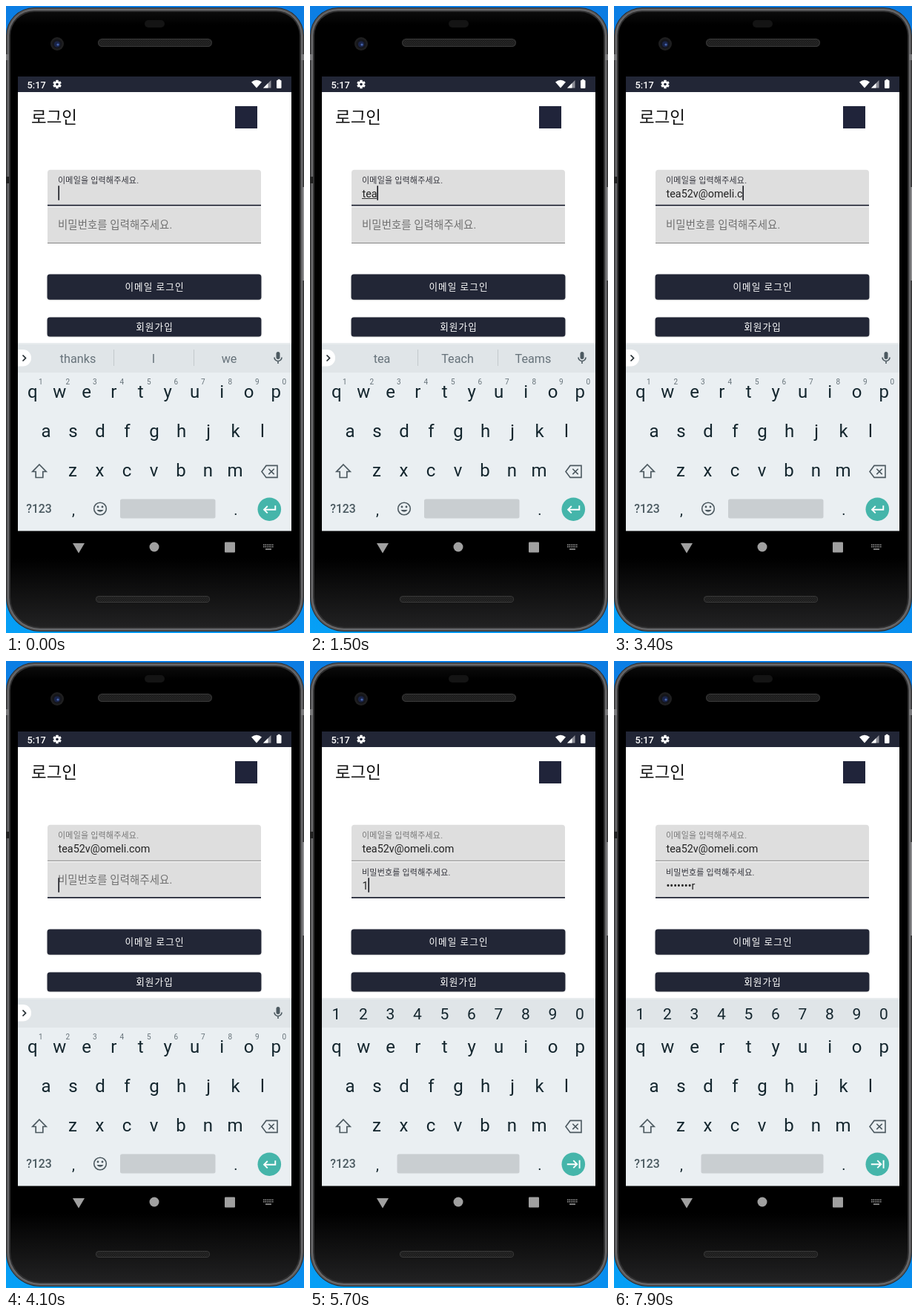
Recreate the animation shown at these times as an HTML page with a canvas. Size 402x845 px, loop 8000 ms.

```html
<!DOCTYPE html>
<html lang="ko">
<head>
<meta charset="utf-8">
<title>로그인</title>
<style>
html, body { margin: 0; width: 100%; height: 100%; overflow: hidden; background: #0b84ea; }
canvas { display: block; width: 402px; height: 845px; }
</style>
</head>
<body>
<canvas id="stage"></canvas>
<script>
const W = 402, H = 845, LOOP = 8000;
const NAVY = '#222636', INK = '#14262e', ICON = '#4c5960', TEAL = '#45b5aa';
const FONT = 'Roboto, "Noto Sans CJK KR", "Noto Sans CJK", sans-serif';
const INPUT_SIZE = 14.4, INPUT_X = 70.5;

const canvas = document.getElementById('stage');
const c = canvas.getContext('2d');
const dpr = window.devicePixelRatio || 1;
canvas.width = W * dpr;
canvas.height = H * dpr;

const COMMON = ['thanks', 'I', 'we'];
// [start, typed email, suggestions]
const EMAIL = [
  [0, '', COMMON],
  [1200, 't', COMMON],
  [1300, 'te', ['t', 'to', 'the']],
  [1400, 'tea', ['te', 'tea', 'tell']],
  [1500, 'tea', ['tea', 'Teach', 'Teams']],
  [1600, 'tea5', ['tea', 'Teach', 'Teams']],
  [1800, 'tea5', ['tea5', 'Tea5', 'teas5']],
  [1900, 'tea52', ['tea52', 'Tea52', 'teas52']],
  [2000, 'tea52v', ['tea52v', 'Tea52v', 'teach52v']],
  [2200, 'tea52v@', []],
  [2300, 'tea52v@o', []],
  [2500, 'tea52v@om', []],
  [2700, 'tea52v@omel', []],
  [3000, 'tea52v@omeli', []],
  [3200, 'tea52v@omeli.', COMMON],
  [3400, 'tea52v@omeli.c', []],
  [3500, 'tea52v@omeli.co', []],
  [3700, 'tea52v@omeli.com', []]
];
const SECRET = '123wqaer';
const SECRET_TIMES = [5700, 5900, 6200, 6400, 6700, 6900, 7200, 7400];
const CARET_OFF = [[300, 800], [4400, 4800], [5300, 5700], [7900, 8000]];
const FOCUS_MOVE = 4100, NUMBER_ROW = 4200;

function box(x, y, w, h, color, r = 0) {
  c.fillStyle = color;
  c.beginPath();
  c.roundRect(x, y, w, h, r);
  c.fill();
}

function disc(x, y, r, color) {
  c.fillStyle = color;
  c.beginPath();
  c.arc(x, y, r, 0, Math.PI * 2);
  c.fill();
}

function text(s, x, y, size, color, { align = 'left', weight = 400, gap = 0 } = {}) {
  c.font = `${weight} ${size}px ${FONT}`;
  c.letterSpacing = gap + 'px';
  c.textAlign = align;
  c.fillStyle = color;
  c.fillText(s, x, y);
  return c.measureText(s).width;
}

function shape(d, x, y, color, line = 0) {
  c.save();
  c.translate(x, y);
  const p = new Path2D(d);
  if (line) {
    c.strokeStyle = color;
    c.lineWidth = line;
    c.stroke(p);
  } else {
    c.fillStyle = color;
    c.fill(p);
  }
  c.restore();
}

function gradient(x0, y0, x1, y1, ...stops) {
  const g = c.createLinearGradient(x0, y0, x1, y1);
  stops.forEach(([at, color]) => g.addColorStop(at, color));
  return g;
}

function speaker(x, y, w, h) {
  box(x, y, w, h, '#3a3a3a', h / 2);
  box(x + 1, y + 1, w - 2, h - 2, '#1b1b1b', h / 2);
  c.save();
  c.beginPath();
  c.roundRect(x + 1, y + 1, w - 2, h - 2, h / 2);
  c.clip();
  c.strokeStyle = '#2d2d2d';
  c.lineWidth = 0.6;
  c.beginPath();
  for (let i = -h; i < w; i += 3) {
    c.moveTo(x + i, y + h);
    c.lineTo(x + i + h, y);
    c.moveTo(x + i, y);
    c.lineTo(x + i + h, y + h);
  }
  c.stroke();
  c.restore();
}

// One layer of the casing, inset from the stage edge.
function shell(inset, color) {
  const top = 38 - inset, bottom = 46 - inset;
  box(inset, 2 + inset, W - 2 * inset, 841 - 2 * inset, color, [top, top, bottom, bottom]);
}

function phone() {
  box(0, 0, W, H, gradient(0, H, W, 0, [0, '#06a0f6'], [0.3, '#0a84ea'], [1, '#0c7ce2']));
  shell(0, '#29292a');
  shell(1, '#5c5c5e');
  shell(3, '#727274');
  shell(4, '#303031');
  shell(6, gradient(0, 0, 0, H, [0, '#101010'], [0.03, '#000'], [0.88, '#000'], [1, '#242425']));
  box(0, 65, 4, 8, '#7a7a7c');
  box(398, 65, 4, 8, '#7a7a7c');
  box(0, 230, 4, 9, '#222');
  box(400, 244, 2, 126, '#8c8c8e');
  box(187, 19, 27, 10, '#141414', 5);
  speaker(124, 44, 154, 11);
  speaker(121, 795, 154, 9);
  disc(69, 51, 9, '#1f1f20');
  disc(69, 51, 6.5, '#15161b');
  disc(69, 51.5, 4, '#1a2448');
  disc(70, 52, 1.6, '#4766ae');
}

function statusBar() {
  box(16, 95, 369, 21, NAVY);
  text('5:17', 28.5, 110.5, 12.8, '#fff', { weight: 500 });
  c.save();
  c.translate(69, 105.5);
  for (let i = 0; i < 6; i++) {
    box(-1.7, -5.8, 3.4, 4, '#fff', 0.6);
    c.rotate(Math.PI / 3);
  }
  disc(0, 0, 4.3, '#fff');
  disc(0, 0, 1.8, NAVY);
  c.restore();
  shape('M0 10.5L-7 2.5Q0 -3 7 2.5Z', 338, 100, '#fff');
  shape('M0 10.5L10.5 0V10.5Z', 347, 100, '#8d8e97');
  shape('M0 10.5L6.5 4V10.5Z', 347, 100, '#fff');
  box(365, 100, 6.5, 11, '#fff', 1);
  box(366.7, 98.8, 3, 2, '#fff');
}

function field(y, focused, r) {
  box(56, y, 288, 49, '#dedede', r);
  if (focused) box(56, y + 47, 288, 1.8, NAVY);
  else box(56, y + 48, 288, 1, '#858585');
}

function caret(x, y) {
  box(Math.floor(x - 0.5) + 0.4, y, 1.6, 19.5, '#17181f');
}

function button(y, h, label, baseline) {
  c.save();
  c.shadowColor = 'rgba(0,0,0,.25)';
  c.shadowBlur = 1.5;
  c.shadowOffsetY = 0.5;
  box(55.6, y, 288.8, h, NAVY, 3.5);
  c.restore();
  text(label, 200.5, baseline, 12.57, '#fff', { align: 'center', weight: 500, gap: 1.1 });
}

function form(t, state) {
  box(16, 116, 369, 338, '#fff');
  text('로그인', 34, 157.8, 22.45, '#111');
  box(309, 135, 30, 30, '#20243a');

  const second = t >= FOCUS_MOVE;
  const floated = t >= NUMBER_ROW;
  const blink = !CARET_OFF.some(([a, b]) => t >= a && t < b);
  const small = { gap: 0.2 };

  field(220.7, !second, [4, 4, 0, 0]);
  field(271, second, 0);
  text('이메일을 입력해주세요.', 70, 239, 11, second ? '#777' : '#33343c', small);
  const width = text(state[1], INPUT_X, 257.5, INPUT_SIZE, '#222');
  if (t >= 1200 && t < 2200) box(70, 259, width, 1, '#333');
  if (!second && blink) caret(INPUT_X + width, 242.3);

  if (floated) text('비밀번호를 입력해주세요.', 70, 289, 11, '#33343c', small);
  else text('비밀번호를 입력해주세요.', 70, 299.5, INPUT_SIZE, '#707070', { gap: 0.1 });
  const typed = SECRET_TIMES.filter(at => t >= at).length;
  const shown = typed ? '•'.repeat(typed - 1) + SECRET[typed - 1] : '';
  const end = text(shown, INPUT_X, 307.5, INPUT_SIZE, '#222');
  if (second && blink) caret(INPUT_X + end, 292.3);

  button(361.4, 34.4, '이메일 로그인', 382.7);
  button(419.4, 26, '회원가입', 436.7);
}

function keyRow(keys, x, y, size = 24) {
  [...keys].forEach((k, i) => text(k, x + 36.5 * i, y, size, INK, { align: 'center' }));
}

function suggestions(words) {
  box(16, 463, 18, 22.5, '#fff', [0, 11, 11, 0]);
  shape('M-2 -4L2 0L-2 4', 24.5, 474.5, '#20292e', 1.7);
  if (words.length) {
    box(145, 463, 1, 22, '#c3c9cc');
    box(253, 463, 1, 22, '#c3c9cc');
  }
  words.forEach((w, i) => text(w, 97 + 102 * i, 480.5, 16.2, '#66727a', { align: 'center' }));
  box(364.5, 466, 5, 10, ICON, 2.5);
  shape('M-5 0A5 5 0 0 0 5 0M0 5V8.5', 367, 473.5, ICON, 1.6);
}

function keyboard(t, words) {
  const numeric = t >= NUMBER_ROW;
  box(16, 454, 369, 253.5, '#eaeff2');
  box(16, 454, 369, 40, '#e0e5e8');
  box(16, 454, 369, 2, '#e8ecee');
  if (numeric) {
    keyRow('1234567890', 35.5, 482.5, 21);
  } else {
    suggestions(words);
    [...'1234567890'].forEach((n, i) =>
      text(n, 46.7 + 36.5 * i, 510, 10, '#667279', { align: 'center' }));
  }
  keyRow('qwertyuiop', 35.7, 528);
  keyRow('asdfghjkl', 54, 580.5);
  keyRow('zxcvbnm', 90, 633.5);

  shape('M0 -9L9.2 0.5H4.8V8.5H-4.8V0.5H-9.2Z', 45, 627, ICON, 1.7);
  shape('M-4.5 -8H10.5V8H-4.5L-10.5 0ZM-1.2 -3.7L6.2 3.7M6.2 -3.7L-1.2 3.7', 355.5, 627.4, ICON, 1.6);

  text('?123', 44.5, 683, 15.8, '#4a5960', { align: 'center', weight: 500 });
  text(',', 91, 685.5, 20, INK, { align: 'center' });
  text('.', 310, 685.5, 20, INK, { align: 'center' });
  const spaceX = numeric ? 117.5 : 154;
  box(spaceX, 664.5, 282.5 - spaceX, 26, '#c9ced1', 2.5);
  if (!numeric) {
    c.strokeStyle = ICON;
    c.lineWidth = 1.6;
    c.beginPath();
    c.arc(127, 677.5, 8.3, 0, Math.PI * 2);
    c.stroke();
    disc(124, 675, 1.4, ICON);
    disc(130, 675, 1.4, ICON);
    shape('M-4.5 0A5 5 0 0 0 4.5 0Z', 127, 679, ICON);
  }

  disc(355.3, 678.2, 15.8, TEAL);
  const arrow = numeric
    ? 'M-8.5 0H5M0 -5L5 0L0 5M8.3 -5.5V5.5'
    : 'M8 -5V0.5H-7M-2.5 -4.2L-7.2 0.5L-2.5 5.2';
  shape(arrow, 355.3, 678.2, '#fff', 1.9);
}

function navBar() {
  const gray = '#a0a0a0';
  shape('M-8 -6H8L0 7.5Z', 98, 730, gray);
  disc(200, 729, 6.5, gray);
  box(295, 722.5, 14, 14, gray, 1);
  for (let row = 0; row < 2; row++)
    for (let i = 0; i < 6; i++) box(347 + i * 2.4, 725.5 + row * 2.6, 1.5, 1.5, gray);
  box(350, 731.3, 8, 1.5, gray);
}

function draw(t) {
  c.setTransform(dpr, 0, 0, dpr, 0, 0);
  const state = EMAIL.filter(s => t >= s[0]).pop();
  phone();
  statusBar();
  form(t, state);
  keyboard(t, state[2]);
  navBar();
}

const start = performance.now();
function tick() {
  draw((performance.now() - start) % LOOP);
  requestAnimationFrame(tick);
}
tick();
</script>
</body>
</html>
```
